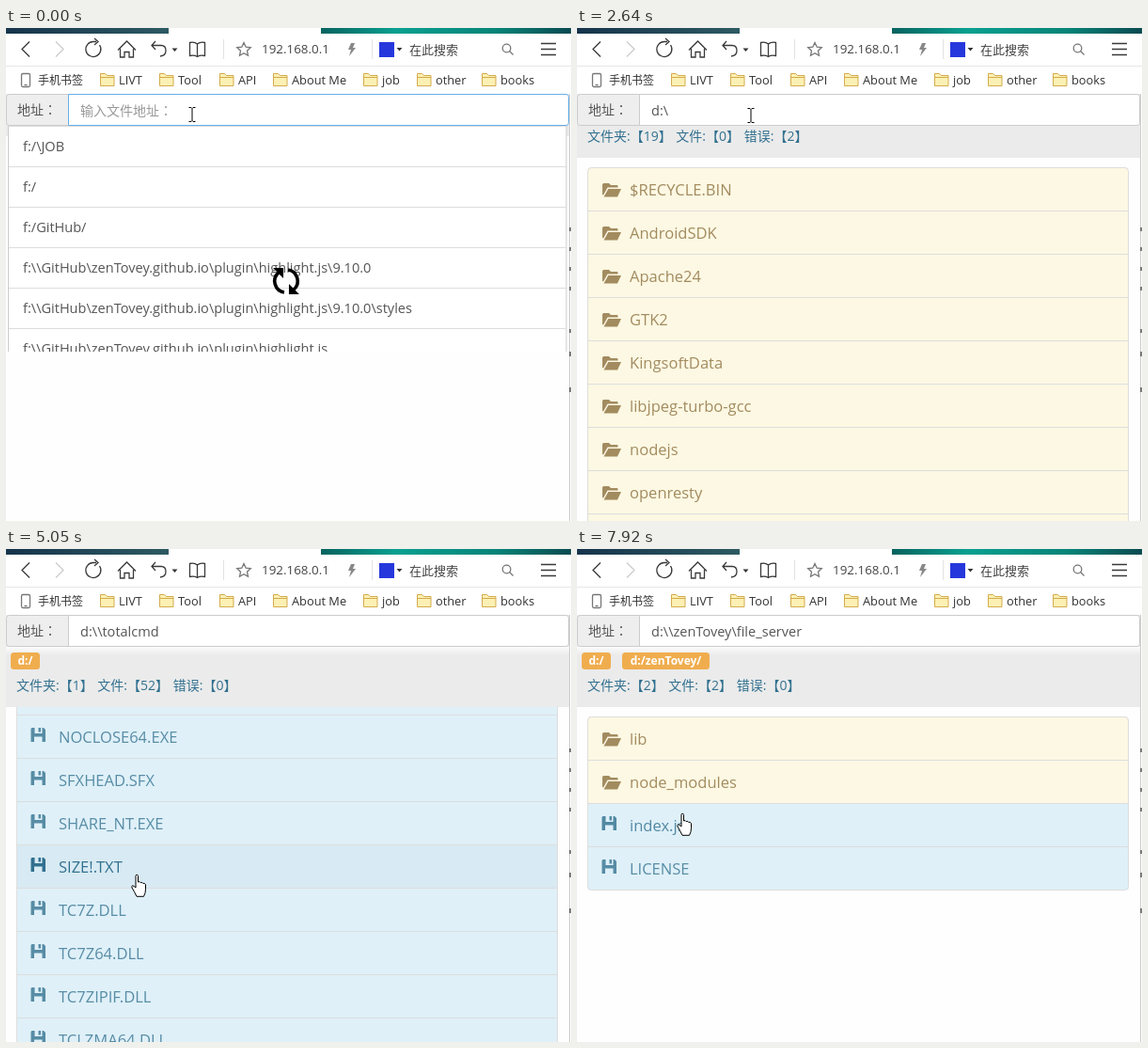
These frames come from a looping animation (601x524 px, 8 s). An HTML page:

```html
<!DOCTYPE html>
<html lang="zh-CN">
<head>
<meta charset="utf-8">
<title>File browser</title>
<style>
html, body { margin: 0; width: 100%; height: 100%; overflow: hidden; background: #fff; }
svg { display: block; }
text { font-family: 'Open Sans', 'Noto Sans CJK SC', 'Noto Sans CJK', 'Noto Sans', sans-serif; fill: #555; white-space: pre; }
.row { font-size: 16.55px; }
.path { font-size: 14.55px; }
.cjk { font-size: 14px; }
.mid { font-family: 'Noto Sans CJK TC', 'Noto Sans CJK', sans-serif; }
.mark { font-size: 12.8px; fill: #333; }
.tag { font-size: 12px; font-weight: 700; fill: #fff; }
.info { fill: #31708f; word-spacing: 1px; }
.ico { fill: none; stroke: #3a3a3a; stroke-width: 1.3; }
</style>
</head>
<body>
<svg id="stage" width="601" height="524" viewBox="0 0 601 524">
  <defs>
    <linearGradient id="left"><stop offset="0" stop-color="#16344b"/><stop offset="1" stop-color="#2d5a63"/></linearGradient>
    <linearGradient id="right"><stop offset="0" stop-color="#07635f"/><stop offset=".3" stop-color="#0aa090"/><stop offset=".7" stop-color="#088478"/><stop offset="1" stop-color="#0a4a50"/></linearGradient>
    <linearGradient id="fade" x2="0" y2="1"><stop offset="0" stop-color="#fbfbfb"/><stop offset="1" stop-color="#ebebeb"/></linearGradient>
    <clipPath id="dropClip"><rect y="104" width="599" height="240"/></clipPath>
  </defs>
  <rect width="601" height="524" fill="#fefefe"/>
  <g id="lists"></g>
  <rect id="head" y="70" width="599" height="45" fill="#ebebeb"/>
  <rect id="glow" y="104" width="599" height="9" fill="url(#fade)"/>
  <g id="tags"></g>
  <text id="info" class="cjk info" x="11"></text>
  <rect x=".5" y="70.5" width="70" height="33" rx="3" fill="#eee" stroke="#ccc"/>
  <text class="cjk" x="12" y="92">地址<tspan class="mid" lang="zh-TW">：</tspan></text>
  <path id="field" d="M66.5 70.5H596q2.5 0 2.5 3V100.5q0 3-2.5 3H66.5z" fill="#fff"/>
  <text id="value" class="path" x="79" y="92.5"></text>
  <text id="hint" class="cjk" x="79" y="93" style="fill:#999">输入文件地址<tspan class="mid" lang="zh-TW">：</tspan></text>
  <g id="drop" clip-path="url(#dropClip)"></g>
  <rect id="thumb" x="595" width="4" height="192" rx="2" fill="#c4c4c4"/>
  <g id="spin">
    <g id="arm"><path d="M-12-2A12 12 0 0 1 9-8" fill="none" stroke="#000" stroke-width="3.6"/><path d="M14-14V-3H3z"/></g>
    <use href="#arm" transform="rotate(180)"/>
  </g>
  <g id="chrome">
    <rect width="601" height="70" fill="#fff"/>
    <rect width="173" height="6" fill="url(#left)"/>
    <rect x="335" width="266" height="6" fill="url(#right)"/>
    <path d="M0 40.5H601" stroke="#e6e6e6"/>
    <path d="M231.5 12V33M389.5 12V33" stroke="#e2e2e2"/>
    <g class="ico">
      <path d="M25 14.5L17 22.5l8 8"/>
      <path id="forward" d="M53 14.5l8 8-8 8"/>
      <path d="M99.5 18A8 8 0 1 1 93 14.5h3M94 11l4 3.5-4 3.5"/>
      <path d="M119 23.5L128.5 14l9.5 9.5M121.5 22V31H126V25.5H131V31H135.5V22"/>
      <path d="M159 14l-4 4.5 4 4.5M155 18.5H165q5 0 5 5.5t-6 6"/>
      <path d="M203.5 17q-3-2.5-8-1.5V29.5q5-1 8 1 3-2 8-1V15.5q-5-1-8 1.500V30"/>
      <path d="M253 15.5l2.2 4.7 5.1.6-3.8 3.5 1 5-4.5-2.5-4.5 2.5 1-5-3.8-3.5 5.1-.6z" style="stroke:#777"/>
      <circle cx="532.5" cy="21.5" r="4.3" style="stroke:#777"/><path d="M535.5 24.5l4 4" style="stroke:#777"/>
      <path d="M569 16.5h16M569 22.5h16M569 28.5h16"/>
      <rect x="16.5" y="48.5" width="9" height="14" rx="1.5" style="stroke:#777"/><path d="M19.5 60.5h3" style="stroke:#777"/>
    </g>
    <path d="M176.5 21.5h6l-3 3.5zM415.5 21h6l-3 3.5z" fill="#333"/>
    <path d="M367 16h4l-2 5h3l-7 9 2-7h-3z" fill="#888"/>
    <rect x="397" y="15" width="16" height="16" fill="#2638dc"/>
    <text x="272" y="27" style="font-size:13.4px;fill:#444">192.168.0.1</text>
    <text x="429" y="28" style="font-size:13px;fill:#444">在此搜索</text>
    <text x="34" y="60" style="font-size:12px;fill:#333">手机书签</text>
  </g>
  <path d="M599.5 70V524" stroke="#ccc"/>
  <path d="M600 212v4m0 17v4m0 17v4m0 17v4m0 41v4m0 20v5m0 33v5" stroke="#777" stroke-width="2"/>
  <g id="cursor">
    <path id="beam" d="M-3.5-7.5h2.500l1 1 1-1h2.500M0-6.5V6.500M-3.500 7.500h2.500l1-1 1 1h2.500" fill="none" stroke="#000"/>
    <path id="arrow" d="M0 0V16l3.7-3.5 2.6 6 2.4-1-2.6-5.8H11.5z" fill="#fff" stroke="#000"/>
    <path id="hand" transform="translate(-6 0)" d="M5 1.5q0-1.2 1.2-1.2t1.3 1.2V8q2-1 2.6.6 2-.8 2.6.8 2-.6 2.8 1.4v5q0 4-2 7.500H6Q4 19 1 14q-.6-2 .6-2.2Q3 12 5 14z" fill="#fff" stroke="#000"/>
  </g>
</svg>
<script>
const $ = id => document.getElementById(id);
const raw = String.raw;
const LOOP = 8000, ROW = 46, USER = 'zenTovey';

function add(parent, tag, attrs, text) {
  const el = document.createElementNS('http://www.w3.org/2000/svg', tag);
  for (const k in attrs) el.setAttribute(k, attrs[k]);
  if (text !== undefined) el.textContent = text;
  parent.append(el);
  return el;
}
const set = (el, k, v) => el.setAttribute(k, v);
const show = (el, on) => { el.style.display = on ? '' : 'none'; };
const clamp = v => Math.max(0, Math.min(1, v));

// Linear interpolation over [time, value, value...] points
function track(points, t) {
  let i = 0;
  while (i < points.length - 2 && t >= points[i + 1][0]) i++;
  const a = points[i], b = points[i + 1], k = clamp((t - a[0]) / (b[0] - a[0]));
  return a.slice(1).map((v, n) => v + (b[n + 1] - v) * k);
}

const folderIcon = 'M0 13V2.5Q0 1 1.5 1H7l2 2H15.5q1 0 1 1V5.5H5.5L1 13.5zM6.3 7H20l-4 8.5H1.5z';
const diskIcon = 'M1 0H4V6H12V0H13.5L15.5 2V15H12V9.5H3.5V15H0V1zM8 0H10.5V4.5H8z';
const kinds = {
  dir: { bg: '#fcf8e3', over: '#fff5e2', ink: '#8a6d3b', icon: folderIcon, at: [27, 15] },
  file: { bg: '#dff0f8', over: '#d8eaf3', ink: '#31708f', icon: diskIcon, at: [26.5, 13] },
  bad: { bg: '#f2dede', over: '#ebcccc', ink: '#a94442', icon: diskIcon, at: [26.5, 13] }
};

function makeList(top, dirs, files = [], bad = []) {
  const g = add($('lists'), 'g', {});
  const rows = [];
  const put = kind => name => {
    const y = rows.length * ROW, k = kinds[kind];
    add(g, 'rect', { x: 11, y, width: 576, height: ROW, fill: k.bg });
    const over = add(g, 'rect', { x: 11, y, width: 576, height: ROW, fill: k.over, opacity: 0 });
    add(g, 'path', { d: `M11 ${y - .5}H587`, stroke: '#ddd' });
    const ink = add(g, 'g', { fill: k.ink, opacity: .78 });
    add(ink, 'path', { d: k.icon, transform: `translate(${k.at[0]} ${y + k.at[1]})` });
    add(ink, 'text', { class: 'row', x: 56, y: y + 29, style: 'fill:' + k.ink }, name);
    rows.push({ over, ink });
  };
  dirs.forEach(put('dir'));
  files.forEach(put('file'));
  bad.forEach(put('bad'));
  const height = rows.length * ROW;
  // white frame rounds the outer corners
  add(g, 'rect', { x: 10, y: -1.5, width: 578, height: height + 2, rx: 4, fill: 'none', stroke: '#fefefe', 'stroke-width': 2 });
  add(g, 'rect', { x: 11.5, y: -.5, width: 575, height, rx: 4, fill: 'none', stroke: '#ddd' });
  return { g, rows, top };
}

const root = makeList(149,
  ['$RECYCLE.BIN', 'AndroidSDK', 'Apache24', 'GTK2', 'KingsoftData', 'libjpeg-turbo-gcc', 'nodejs', 'openresty',
   'PerfLogs', 'php', 'Program Files', 'Program Files (x86)', 'ProgramData', 'Python27', 'QMDownload', 'totalcmd',
   'www', 'xampp', USER], [], ['pagefile.sys', 'System Volume Information']);
const tools = makeList(179, ['LANGUAGE'],
  ['CGLPT64.SYS', 'CGLPT9X.VXD', 'CGLPTNT.SYS', 'DEFAULT.BAR', 'DESCRIPT.ION', 'FILE_ID.DIZ', 'FRERES32.DLL',
   'HISTORY.TXT', 'KEYBOARD.TXT', 'NO.BAR', 'NOCLOSE.EXE', 'NOCLOSE64.EXE', 'SFXHEAD.SFX', 'SHARE_NT.EXE',
   'SIZE!.TXT', 'TC7Z.DLL', 'TC7Z64.DLL', 'TC7ZIPIF.DLL', 'TCLZMA64.DLL', 'TCMADM64.EXE', 'TCMADMIN.EXE',
   'TCMDLZMA.DLL', 'TCMDX32.EXE', 'TCMDX64.EXE']);
const home = makeList(179, ['file_server', 'plugin']);
const server = makeList(179, ['lib', 'node_modules'], ['index.js', 'LICENSE']);
const lists = [root, tools, home, server];

// Each scene loads from "at", then its list fades in between fade[0] and fade[1]
const scenes = [
  { at: 0, list: root, fade: [860, 1620], path: '', count: [19, 0, 2], tags: 0 },
  { at: 1900, list: root, fade: [2080, 2260], path: 'd:\\', count: [19, 0, 2], tags: 0 },
  { at: 3930, list: tools, fade: [4000, 4180], path: raw`d:\\totalcmd`, count: [1, 52, 0], tags: 1 },
  { at: 5320, list: root, fade: [5400, 5580], path: 'd:\\', count: [19, 0, 2], tags: 0 },
  { at: 6850, list: home, fade: [6940, 7100], path: raw`d:\\` + USER, count: [2, 0, 0], tags: 1 },
  { at: 7300, list: server, fade: [7400, 7600], path: raw`d:\\` + USER + raw`\file_server`, count: [2, 2, 0], tags: 2 }
];
const scrolls = [[0, 0], [2900, 0], [3260, 300], [3440, 300], [3700, 500], [3929, 500], [3930, 0], [4520, 0],
  [5050, 554], [5230, 600], [5319, 600], [5320, 0], [5480, 0], [5950, 507], [6130, 619], [6849, 619], [6850, 0], [8000, 0]];
const moves = [[0, 198, 92], [2080, 198, 92], [2260, 185, 92], [2640, 185, 92], [2900, 112, 340], [3260, 105, 350],
  [3440, 105, 350], [3700, 105, 362], [4160, 105, 362], [4340, 139, 346], [5320, 139, 346], [5600, 113, 393],
  [6220, 113, 393], [6430, 112, 285], [6670, 112, 381], [6850, 112, 381], [7150, 112, 196], [7650, 112, 196], [7920, 112, 281]];
// list, row, from, to
const hovers = [[root, 15, 3650, 3930], [tools, 15, 4850, 5320], [root, 15, 5850, 5900], [root, 16, 5910, 5990],
  [root, 18, 6450, 6850], [home, 0, 7120, 7300], [server, 2, 7900, 8000]];

const repo = raw`f:\\GitHub` + '\\' + USER + raw`.github.io\plugin\highlight.js`;
const recent = ['d:\\', raw`f:/\JOB`, 'f:/', 'f:/GitHub/', repo + raw`\9.10.0`, repo + raw`\9.10.0\styles`, repo];
const drop = $('drop');
add(drop, 'rect', { x: 2.5, y: 104.5, width: 593.5, height: 260, fill: '#fff', stroke: '#ccc' });
const items = add(drop, 'g', {});
recent.forEach((name, i) => {
  const y = 61 + i * 43;
  add(items, 'text', { class: 'path', x: 18, y: y + 27 }, name);
  add(items, 'path', { d: `M3 ${y + 43.5}H596`, stroke: '#ddd' });
});

const tags = [[5, 31, 'd:/'], [48, 93, `d:/${USER}/`]].map(([x, width, label]) => {
  const g = add($('tags'), 'g', {});
  add(g, 'rect', { x, y: 110, width, height: 18, rx: 3.5, fill: '#f0ad4e' });
  add(g, 'text', { class: 'tag', x: x + width / 2, y: 123, 'text-anchor': 'middle' }, label);
  return g;
});

[[100, 'LIVT'], [163, 'Tool'], [227, 'API'], [284, 'About Me'], [380, 'job'], [437, 'other'], [506, 'books']].forEach(([x, name]) => {
  add($('chrome'), 'path', { d: `M${x + .5} 61.5V48.5h5l2 2h7.5v11zM${x + .5} 52.5h14.5`, fill: '#fdf0b4', stroke: '#d3ab4c' });
  add($('chrome'), 'text', { class: 'mark', x: x + 20, y: 60 }, name);
});

const typed = t => 'd:\\'.slice(0, [630, 1080, 1440].filter(k => t >= k).length);

function render(t) {
  const scene = scenes.filter(s => s.at <= t).pop();
  const first = scene.at === 0, open = t < 2170;
  const [scroll] = track(scrolls, t);

  lists.forEach(l => show(l.g, l === scene.list));
  const { g, rows, top } = scene.list;
  set(g, 'transform', `translate(0 ${top - Math.round(scroll)})`);
  set(g, 'opacity', clamp((t - scene.fade[0]) / (scene.fade[1] - scene.fade[0])));
  rows.forEach((r, i) => {
    let k = 0;
    for (const [list, row, from, to] of hovers)
      if (list === scene.list && row === i) k = Math.max(k, Math.min(clamp((t - from) / 180), clamp(1 - (t - to) / 180)));
    set(r.over, 'opacity', k);
    set(r.ink, 'opacity', .78 + .22 * k);
  });

  set($('head'), 'height', scene.tags ? 98 : first && t < 720 ? 45 : 68);
  show($('glow'), scene.tags);
  tags.forEach((el, i) => show(el, i < scene.tags));
  const [d, f, e] = scene.count;
  $('info').textContent = `文件夹:【${d}】 文件:【${f}】 错误:【${e}】`;
  set($('info'), 'y', scene.tags ? 150 : 120);

  const value = first ? typed(t) : scene.path;
  $('value').textContent = value;
  show($('hint'), !value);
  set($('field'), 'stroke', open ? '#66afe9' : '#ccc');
  show(drop, open);
  set(items, 'transform', `translate(0 ${first ? 0 : 43})`);
  show(items.firstChild, !first);

  show($('thumb'), t >= 3260 && t < 3930);
  set($('thumb'), 'y', 70 + scroll * 454 / 1073);

  show($('spin'), t < scene.fade[0]);
  const turn = (first ? 90 : 0) + (t - scene.at) * .36;
  set($('spin'), 'transform', `translate(${first ? 298 : 299} ${first ? 269 : 268}) rotate(${turn})`);
  $('forward').style.stroke = t >= 5320 && t < 6850 ? '#3a3a3a' : '#ccc';

  const [x, y] = track(moves, t);
  set($('cursor'), 'transform', `translate(${Math.round(x)} ${Math.round(y)})`);
  const shape = y < 104 ? 'beam' : t < 4000 ? 'arrow' : 'hand';
  ['beam', 'arrow', 'hand'].forEach(id => show($(id), id === shape));
}

const start = performance.now();
function tick() {
  render((performance.now() - start) % LOOP);
  requestAnimationFrame(tick);
}
render(0);
requestAnimationFrame(tick);
</script>
</body>
</html>
```
